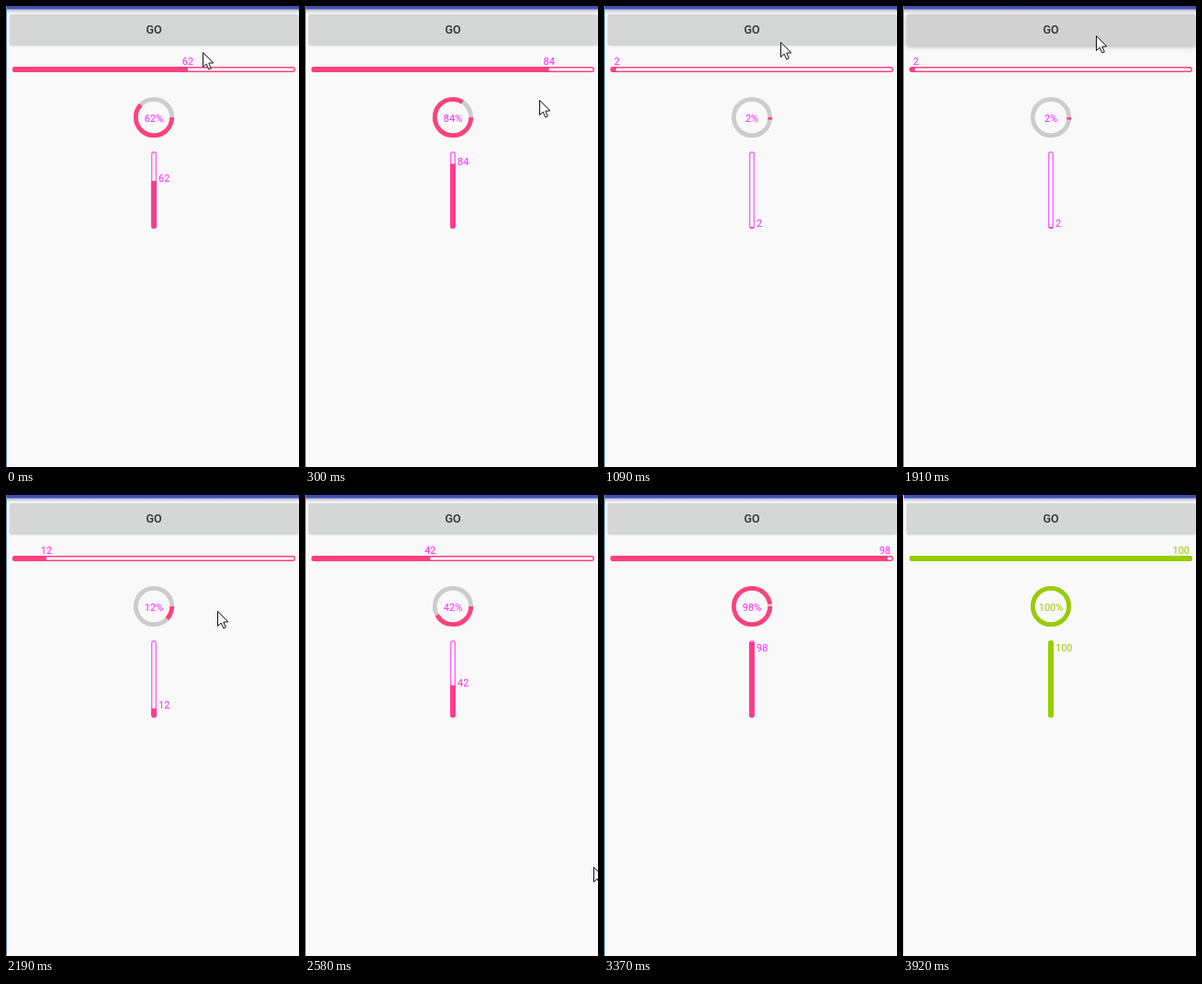
An HTML page with a canvas for the animation above (4020 ms loop, 319 by 501 pixels).

```html
<!DOCTYPE html>
<html lang="en">
<head>
<meta charset="utf-8">
<title>Progress bars</title>
<style>
html, body { margin: 0; width: 100%; height: 100%; overflow: hidden; background: #f9f9f9; }
canvas { display: block; width: 319px; height: 501px; }
</style>
</head>
<body>
<canvas id="stage"></canvas>
<script>
const W = 319, H = 501, LOOP = 4020;
const PINK = '#ff4081', MAGENTA = '#ff24ff', LILAC = '#fb66fb', GREEN = '#99cc00';
const FONT = 'Roboto, Arial, sans-serif';
const RESET = 610, PRESS = 1907, TICK = 133, RUN = PRESS + TICK;

const canvas = document.getElementById('stage');
const scale = window.devicePixelRatio || 1;
canvas.width = W * scale;
canvas.height = H * scale;
const ctx = canvas.getContext('2d');

// Pointer key points: time, x, y
const path = [
  [0, 214, 50], [150, 259, 88], [450, 251, 116], [RESET, 251, 116],
  [1090, 192, 39], [1210, 186, 29], [1450, 186, 24], [1850, 186, 24],
  [PRESS, 210, 32], [RUN, 217, 59], [2310, 243, 195], [2572, 314, 404], [3370, 320, 502]
];

function pointerAt(t) {
  const i = path.findIndex(p => p[0] > t);
  if (i < 0) return [W, H];
  const [t0, x0, y0] = path[i - 1], [t1, x1, y1] = path[i];
  const f = (t - t0) / (t1 - t0);
  return [Math.round(x0 + (x1 - x0) * f), Math.round(y0 + (y1 - y0) * f)];
}

// The screen refreshes in coarse ticks
function snap(t) {
  const [from, step] = t < RESET ? [0, 150] : t < PRESS ? [RESET, 120] : [PRESS, TICK];
  return from + step * Math.floor((t - from) / step);
}

// Progress climbs by twos up to 100
function progressAt(t) {
  if (t < RESET) return 2 * Math.round(31 + 5.4 * t / 150);
  const ticks = Math.max(0, (t - RUN) / TICK);
  return 2 * Math.min(50, Math.round(1.3 + 4.8 * ticks));
}

function rect(x, y, w, h, r, fill) {
  ctx.beginPath();
  ctx.roundRect(x, y, w, h, r);
  ctx.fillStyle = fill;
  ctx.fill();
}

function text(str, x, y, color, align = 'left', font = '11px ') {
  ctx.font = font + FONT;
  ctx.textAlign = align;
  ctx.fillStyle = color;
  ctx.fillText(str, x, y);
}

function drawFrame(edge) {
  ctx.fillStyle = '#f9f9f9';
  ctx.fillRect(0, 0, W, H);
  const fade = ctx.createLinearGradient(0, 3, 0, 8);
  fade.addColorStop(0, '#b4b6c8');
  fade.addColorStop(1, '#f9f9f9');
  ctx.fillStyle = fade;
  ctx.fillRect(1, 3, W, 5);
  ctx.fillStyle = '#3f51b5';
  ctx.fillRect(1, 0, W, 3.5);
  ctx.fillStyle = edge;
  ctx.fillRect(0, 0, 1, H);
}

function drawButton(pressed) {
  ctx.save();
  ctx.shadowColor = pressed ? 'rgba(0,0,0,.3)' : 'rgba(0,0,0,.2)';
  ctx.shadowBlur = (pressed ? 5 : 2) * scale;
  ctx.shadowOffsetY = (pressed ? 1.5 : 0.5) * scale;
  rect(4, 9, 314.5, 33.5, 2, pressed ? '#d1d1d1' : '#d5d7d6');
  ctx.restore();
  text('GO', 161, 30, '#2e2f2f', 'center', '500 12.5px ');
}

// Rounded track whose filled part is given as a clip box
function drawTrack(x, y, w, h, line, fill, box) {
  rect(x, y, w, h, 3, line);
  rect(x + 1.4, y + 1.4, w - 2.8, h - 2.8, 1.6, '#fff');
  ctx.save();
  ctx.beginPath();
  ctx.rect(...box);
  ctx.clip();
  rect(x, y, w, h, 3, fill);
  ctx.restore();
}

function drawRing(v, color) {
  const arc = (end, stroke) => {
    ctx.beginPath();
    ctx.arc(161, 121, 19.7, 0, end);
    ctx.strokeStyle = stroke;
    ctx.stroke();
  };
  ctx.lineWidth = 4.8;
  arc(2 * Math.PI, '#cccccc');
  arc(2 * Math.PI * v / 100, color);
}

function drawPointer(x, y) {
  ctx.save();
  ctx.translate(x + 0.5, y + 0.5);
  ctx.beginPath();
  [[0, 0], [0, 16], [3.7, 12.6], [6.3, 18.4], [8.8, 17.4], [6.3, 11.6], [11.3, 11.4]]
    .forEach(p => ctx.lineTo(...p));
  ctx.closePath();
  ctx.fillStyle = '#fff';
  ctx.fill();
  ctx.lineWidth = 1;
  ctx.strokeStyle = '#111';
  ctx.stroke();
  ctx.restore();
}

function draw(time) {
  const t = snap(time);
  const v = progressAt(t);
  const done = v === 100;
  const fill = done ? GREEN : PINK;
  const ink = done ? GREEN : MAGENTA;
  const right = 7 + 308 * v / 100;
  const top = 242 - 0.84 * v;
  const labelY = Math.max(170, 242 - 0.82 * v);

  ctx.setTransform(scale, 0, 0, scale, 0, 0);
  drawFrame(time >= 3920 ? '#dcdcdc' : '#5f8bad');
  drawButton(t === PRESS);

  drawTrack(7, 66, 308, 6, fill, fill, [7, 66, right - 7, 6]);
  ctx.font = '11px ' + FONT;
  const half = ctx.measureText(v).width / 2;
  text(v, Math.max(11 + half, Math.min(312 - half, right)), 64, ink, 'center');

  drawRing(v, fill);
  text(v + '%', 161, 125.5, ink, 'center');

  drawTrack(158, 158, 6, 84, done ? GREEN : LILAC, done ? GREEN : '#ff3c8c', [158, top, 6, 242 - top]);
  text(v, 166, labelY, ink);

  drawPointer(...pointerAt(t));
}

const start = performance.now();
function tick() {
  draw((performance.now() - start) % LOOP);
  requestAnimationFrame(tick);
}
tick();
</script>
</body>
</html>
```
